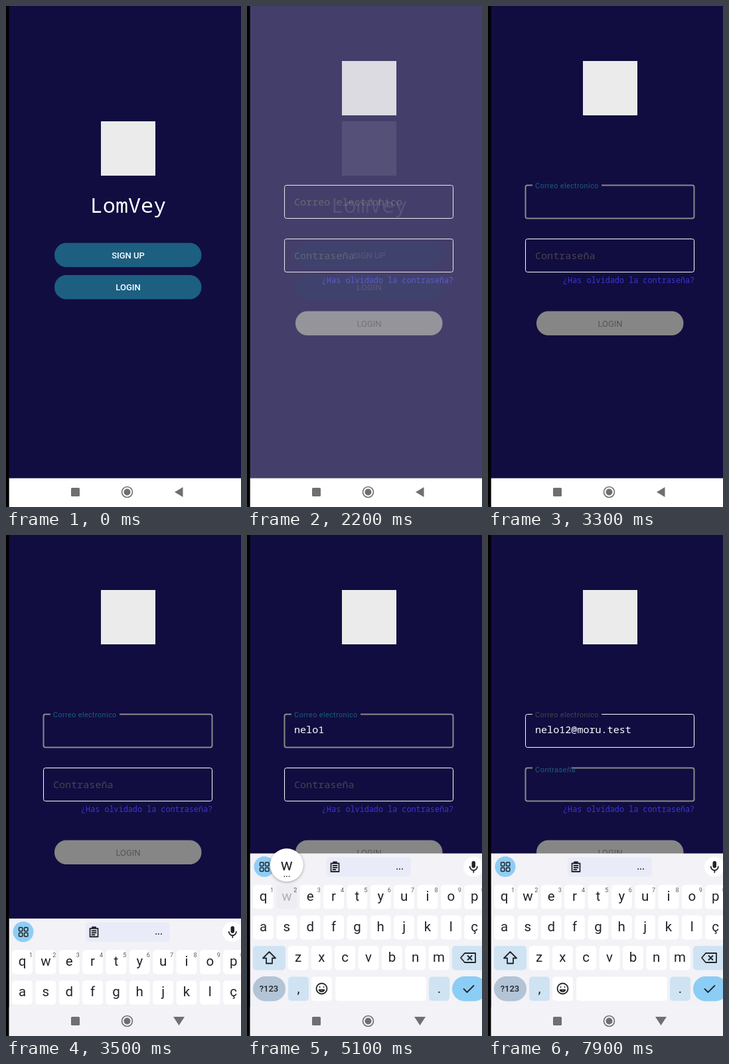
An HTML page that plays this animation: 354x756 px, repeating every 8000 ms.

```html
<!DOCTYPE html>
<html lang="es">
<head>
<meta charset="utf-8">
<title>Login</title>
<style>
  html, body { margin: 0; width: 100%; height: 100%; overflow: hidden; background: #000; }
  svg { display: block; width: 354px; height: 756px; overflow: hidden; }
  text { font-family: Roboto, sans-serif; white-space: pre; }
  .mono { font-family: "Noto Sans Mono", "DejaVu Sans Mono", monospace; }
  .mid { text-anchor: middle; }
  .line { fill: none; stroke: #202428; stroke-width: 1.8; stroke-linecap: round; stroke-linejoin: round; }
</style>
</head>
<body>
<svg id="stage" viewBox="0 0 354 756"></svg>
<script>
const LOOP = 8000;
const C = { bg: "#110d40", veil: "#bbb4cb", teal: "#1c5f80", square: "#ebebeb", hint: "#46454f",
            kb: "#f2f2f7", soft: "#cfe3f3", blue: "#8bcdf5", ink: "#202428" };
const stage = document.getElementById("stage");

function el(parent, tag, attrs = {}, text) {
  const node = document.createElementNS("http://www.w3.org/2000/svg", tag);
  set(node, attrs);
  if (text !== undefined) node.textContent = text;
  parent.appendChild(node);
  return node;
}
function set(node, attrs) {
  for (const name in attrs) node.setAttribute(name, attrs[name]);
}
const group = parent => el(parent, "g");
const box = (parent, x, y, width, height, rx, fill) =>
  el(parent, "rect", { x, y, width, height, rx, fill });
const label = (parent, str, x, y, size, fill, cls = "", weight = 400) =>
  el(parent, "text", { x, y, fill, class: cls, style: `font-size:${size}px;font-weight:${weight}` }, str);
const line = (parent, d) => el(parent, "path", { d, class: "line" });
const show = (node, on) => node.setAttribute("visibility", on ? "inherit" : "hidden");
const clamp = v => Math.max(0, Math.min(1, v));
const ease = v => 1 - (1 - v) ** 2;
const mix = (a, b, k) => a + (b - a) * k;

// Shared backdrop
box(stage, 0, 0, 354, 756, 0, "#000");
box(stage, 4.7, 0, 350, 713, 0, C.bg);

const defs = el(stage, "defs");
el(el(defs, "clipPath", { id: "pill" }), "rect", { x: 73, y: 406, width: 221.5, height: 36.5, rx: 18 });
const glow = el(defs, "radialGradient", { id: "glow" });
el(glow, "stop", { offset: .6, "stop-color": "#fff" });
el(glow, "stop", { offset: 1, "stop-color": "#fff", "stop-opacity": 0 });

// Login form
const form = group(stage);
box(form, 143, 83, 82, 82, 0, C.square);

function makeField(y, hint, gapWidth) {
  const frame = el(form, "rect", { x: 56.5, y, width: 254, height: 50, rx: 3, fill: "none" });
  const gap = box(form, 67, y - 2, 0, 4, 0, C.bg);
  const caption = label(form, hint, 71, y, 15, C.hint);
  return { y, frame, gap, caption, gapWidth };
}
const email = makeField(270.5, "Correo electronico", 104);
const password = makeField(351.5, "Contraseña", 64);
const typed = label(form, "", 71, 299, 15.1, "#fff", "mono");
label(form, "¿Has olvidado la contraseña?", 113, 418, 11.8, "#3d35d6", "mono");
box(form, 73, 460.5, 221.5, 36.5, 18, "#868686");
label(form, "LOGIN", 184, 483.5, 13, "#555", "mid");
const veil = box(stage, 4.7, 0, 350, 713, 0, C.veil);

// Start screen
const start = group(stage);
box(start, 143, 174, 82, 82, 0, C.square);
label(start, "LomVey", 184, 311.5, 31.8, "#fff", "mono mid", 300);
for (const [name, y] of [["SIGN UP", 357.5], ["LOGIN", 406]]) {
  box(start, 73, y, 221.5, 36.5, 18, C.teal);
  if (name === "LOGIN") {
    const clip = el(start, "g", { "clip-path": "url(#pill)" });
    start.wash = box(clip, 73, 406, 222, 37, 0, "#fff");
    start.ripple = el(clip, "circle", { cx: 167, cy: 424, fill: "url(#glow)" });
  }
  label(start, name, 184, y + 23.3, 13, "#fff", "mid", 500);
}

// Keyboard
const keyboard = group(stage);
box(keyboard, 4.7, 480.5, 350, 276, 0, C.kb);
el(keyboard, "circle", { cx: 26, cy: 500.5, r: 15.5, fill: "#8fcdf5" });
for (const [x, y] of [[19.5, 494], [27.5, 494], [19.5, 502], [27.5, 502]])
  set(box(keyboard, x, y, 5.4, 5.4, 1.2, "none"), { class: "line", style: "stroke-width:1.5" });

const toolbar = group(keyboard);
box(toolbar, 120, 486, 127, 29.5, 5, "#e9ecf8");
el(toolbar, "circle", { cx: 341, cy: 500.5, r: 15, fill: "#fff" });
line(toolbar, "M126.5 495.5h12v12.5h-12zM130 495.5v-2h5v2M129.5 499h6M129.5 502h6M129.5 505h4");
label(toolbar, "...", 230, 505, 14, C.ink, "mid", 500);

const suggestions = group(keyboard);
const words = [[88.5, 400], [183, 500], [267, 400]].map(([x, weight]) =>
  label(suggestions, "", x, 506, 16, C.ink, "mid", weight));
for (const x of [133, 232]) box(suggestions, x, 490, 1, 22, 0, "#c9cacf");

const mic = group(keyboard);
box(mic, 338.5, 492, 5.5, 10.5, 2.7, C.ink);
line(mic, "M335.8 500.5a5.5 5.5 0 0 0 11 0M341.3 506v3");

function makeKey(parent, keys, name, cx, y, fill = "#fff", hint) {
  const cap = box(parent, cx - 15.5, y, 31, 36.5, 5, fill);
  const glyph = label(parent, name, cx, y + 24, 20.5, C.ink, "mid");
  if (hint) label(parent, hint, cx + 13, y + 10.5, 9, "#55585e", "mid");
  keys[name] = { cx, cy: y + 18, cap, glyph, fill, hint };
}
function makePanel(rows, hints) {
  const panel = group(keyboard), keys = {};
  rows.forEach((row, r) => [...row].forEach((name, i) =>
    makeKey(panel, keys, name, (r === 2 ? 77 : 24.5) + i * 35.35, 528 + r * 46, "#fff", r === 0 && hints[i])));
  return { panel, keys };
}

const common = {};
box(keyboard, 9, 620, 49, 36.5, 5, C.soft);
box(keyboard, 309, 620, 52, 36.5, 5, C.soft);
line(keyboard, "M328 631h16v14h-16l-6-7zM332.5 635l6 6M338.5 635l-6 6");
box(keyboard, 9, 666, 49, 37.5, 18.5, "#b2c4d6");
const modeText = label(keyboard, "", 33, 689, 13, C.ink, "mid", 500);
makeKey(keyboard, common, ",", 77.5, 666.5, C.soft);
box(keyboard, 97, 666.5, 31, 36.5, 5, "#fff");
el(keyboard, "circle", { cx: 112.5, cy: 684.5, r: 8, class: "line" });
line(keyboard, "M109.5 682v.3M115.5 682v.3M108.5 686.5a4.5 4.5 0 0 0 8 0z");
box(keyboard, 133, 666.5, 137, 36.5, 5, "#fff");
makeKey(keyboard, common, ".", 289.5, 666.5, C.soft);
box(keyboard, 309, 666, 52, 37.5, 18.5, C.blue);
line(keyboard, "M326.5 685l5 5 10-10");

const letters = makePanel(["qwertyuiop", "asdfghjklç", "zxcvbnm"], "1234567890");
line(letters.panel, "M33.5 629l-9.5 9.5h5v8h9v-8h5z");
const symbols = makePanel(["1234567890", "@#€_&-+()/", "*\"':;!?"], "");
label(symbols.panel, "=\\<", 33.5, 643, 14, C.ink, "mid", 500);

const bubble = group(keyboard);
const disc = el(bubble, "circle", { r: 25, style: "filter:drop-shadow(0 1px 2px #0005)" });
const bubbleText = label(bubble, "", 0, 7.5, 24, C.ink, "mid");
const bubbleDots = label(bubble, "...", 0, 18, 13, C.ink, "mid", 500);

// Navigation bar
const navBar = box(stage, 4.7, 712.6, 350, 44, 0, "#fff");
const nav = el(stage, "g", { fill: "#6f6f6f" });
el(nav, "rect", { x: 98, y: 727, width: 13, height: 13, rx: 1.5 });
el(nav, "circle", { cx: 182.5, cy: 733.5, r: 8, fill: "none", stroke: "#6f6f6f", "stroke-width": 1.6 });
el(nav, "circle", { cx: 182.5, cy: 733.5, r: 5 });
const back = el(nav, "path");

// Key, press time, release time, and the character if it is a long press
const presses = [
  ["n", 3850, 3930], ["e", 3980, 4040], ["l", 4080, 4140], ["o", 4160, 4290],
  ["q", 4450, 4780, "1"], ["w", 4900, 5270, "2"], ["@", 5790, 5880],
  ["m", 6230, 6350], ["o", 6440, 6550], ["r", 6610, 6720], ["u", 6760, 6850],
  [".", 6890, 6990], ["t", 7040, 7130], ["e", 7160, 7250], ["s", 7280, 7350], ["t", 7390, 7480]
];

function drawField(field, lift, focused) {
  const resting = lift === 0;
  set(field.frame, { stroke: focused ? "#8a8a8a" : "#fff", "stroke-width": focused ? 2 : 1 });
  set(field.gap, { width: field.gapWidth * lift });
  set(field.caption, {
    y: mix(field.y + 30, field.y + 4, lift),
    fill: focused ? C.teal : C.hint,
    class: resting ? "mono" : "",
    style: `font-size:${mix(15.1, 10.8, lift)}px;letter-spacing:${resting ? 0 : .4}px;font-weight:400`
  });
}

function drawStart(t) {
  const onForm = t >= 2150, fade = clamp((2400 - t) / 200);
  show(form, onForm);
  set(veil, { opacity: onForm ? .3 * fade : 0 });
  set(start, { opacity: onForm ? .1 * fade : 1 });
  const lit = t < 950 ? 0 : clamp((1600 - t) / 250);
  set(start.wash, { opacity: .12 * lit });
  set(start.ripple, { r: mix(30, 150, ease(clamp((t - 950) / 550))), opacity: .13 * lit });
}

function drawKeyboard(t, text) {
  const rise = ease(clamp((t - 3380) / 300));
  show(keyboard, rise > 0);
  set(keyboard, { transform: `translate(0 ${276 * (1 - rise)})` });
  set(navBar, { fill: rise > 0 ? C.kb : "#fff" });
  set(back, { d: rise > 0 ? "M252 727h17l-8.5 13z" : "M266.5 726v15l-12.5-7.5z" });

  const symbolic = t >= 5480 && t < 6050;
  show(letters.panel, !symbolic);
  show(symbols.panel, symbolic);
  modeText.textContent = symbolic ? "ABC" : "?123";
  const suggesting = t >= 3930 && t < 4780;
  show(suggestions, suggesting);
  show(toolbar, !suggesting);
  [text, "nelo", "nelod"].forEach((word, i) => words[i].textContent = word);

  const press = presses.find(([, from, to]) => t >= from && t < to);
  const keys = { ...(symbolic ? symbols : letters).keys, ...common };
  for (const name in keys) {
    const key = keys[name], down = press && press[0] === name;
    set(key.cap, { fill: down ? "#ededf2" : key.fill });
    set(key.glyph, { fill: down ? "#b0b1b6" : C.ink });
  }
  show(bubble, press);
  if (!press) return;
  const [name, from, , alternate] = press, key = keys[name];
  const held = alternate && t - from > 250;
  set(bubble, { transform: `translate(${key.cx} ${key.cy - 48})` });
  set(disc, { fill: held ? C.blue : "#fff" });
  bubbleText.textContent = held ? alternate : name;
  show(bubbleDots, key.hint && !held);
}

function draw(t) {
  const text = presses.filter(p => p[2] <= t).map(p => p[3] || p[0]).join("");
  const moved = t >= 7750;
  typed.textContent = text;
  drawField(email, ease(clamp((t - 3050) / 170)), t >= 3050 && !moved);
  drawField(password, clamp((t - 7750) / 165), moved);
  drawStart(t);
  drawKeyboard(t, text);
}

function tick() {
  draw(performance.now() % LOOP);
  requestAnimationFrame(tick);
}
tick();
</script>
</body>
</html>
```
